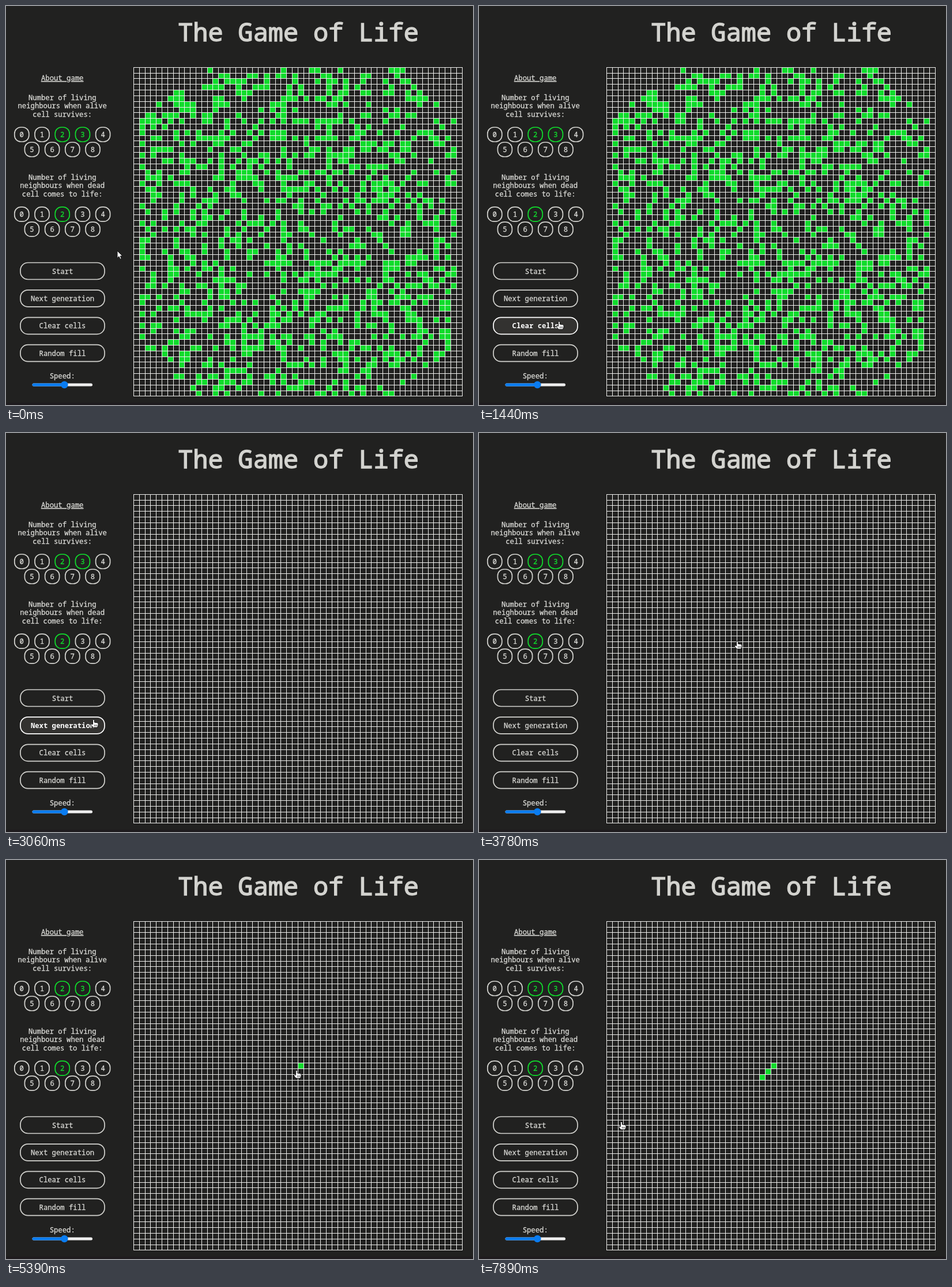
Animation, 810 px wide and 691 px high, one loop 8000 ms. Source, as an HTML page:

```html
<!DOCTYPE html>
<html lang="en">
<head>
<meta charset="utf-8">
<title>The Game of Life</title>
<style>
  html, body { margin: 0; width: 100%; height: 100%; overflow: hidden; background: #212120; }
  svg { display: block; }
  text {
    font: 500 12.25px "Noto Sans Mono", monospace; text-anchor: middle;
    fill: #dbdbd7; stroke: #dbdbd7; stroke-width: .3;
  }
  .title { font-size: 43.5px; fill: #d3d3cf; stroke: #d3d3cf; stroke-width: 1.5; }
  .link { text-decoration: underline; }
  .box { fill: none; stroke: #d3d3cf; stroke-width: 1.7; }
  .on .box { stroke: #10dc2c; }
  .on text { fill: #10dc2c; stroke: #10dc2c; }
  .hover .box { fill: #333230; stroke: #fff; }
  .hover text { fill: #fff; stroke: none; font-weight: 700; }
  .cursor { fill: #fff; stroke: #111; stroke-linejoin: round; }
</style>
</head>
<body>
<svg id="stage" width="810" height="691" viewBox="0 0 810 691"></svg>
<script>
const LOOP = 8000, SIZE = 58, PITCH = 9.82, MID_X = 97.7, LINE = 14.7;
const CLEARED = 1830, STEP = 90;
const gridX = i => Math.floor(221.5 + i * PITCH);
const gridY = j => Math.floor(106.3 + j * PITCH);

const label = (x, y, s, cls = '') => `<text x="${x}" y="${y}" class="${cls}">${s}</text>`;
const boxed = (x, y, w, h, r, s, cls = '') => `<g class="${cls}">
  <rect class="box" x="${x - w / 2}" y="${y - h / 2}" width="${w}" height="${h}" rx="${r}"/>
  ${label(x, y + 4.5, s)}</g>`;

function rule(top, lines, chosen) {
  let out = lines.map((s, i) => label(MID_X, top + i * LINE, s)).join('');
  for (let n = 0; n < 9; n++) {
    const x = MID_X + (n < 5 ? n - 2 : n - 6.5) * 35.2;
    const y = top + (n < 5 ? 60 : 86);
    out += boxed(x, y, 25, 25, 11, n, chosen.includes(n) ? 'on' : '');
  }
  return out;
}

const cellPath = (i, j) => `M${gridX(i)} ${gridY(j)}H${gridX(i + 1)}V${gridY(j + 1)}H${gridX(i)}z`;

function gridLines() {
  let d = '';
  for (let i = 0; i <= SIZE; i++) {
    d += `M${gridX(i) + .5} ${gridY(0)}V${gridY(SIZE) + 1}`;
    d += `M${gridX(0)} ${gridY(i) + .5}H${gridX(SIZE) + 1}`;
  }
  return d;
}

// Seeded random cells in a disc that is cut off by the board's edges
function soup() {
  let seed = 20, d = '';
  const random = () => (seed = (seed * 1664525 + 1013904223) % 2 ** 32) / 2 ** 32;
  for (let j = 0; j < SIZE; j++) {
    for (let i = 1; i < SIZE - 1; i++) {
      const inside = Math.hypot(i - 28.5, j - 28.5) < 34;
      if (random() < .33 && inside) d += cellPath(i, j);
    }
  }
  return d;
}

const buttons = ['Start', 'Next generation', 'Clear cells', 'Random fill'];
const buttonY = n => 459 + n * 47.4;

// Each click fills the next cell of a diagonal
const clickTimes = [4830, 5890, 7170];
const clicked = t => clickTimes.map((at, n) => t >= at ? cellPath(29 - n, 25 + n) : '').join('');

// Where the pointer goes, and when it sets off and arrives
const waypoints = [
  { from: 720, to: 1000, x: 155, y: 503 },
  { from: 1170, to: 1440, x: 139, y: 546 },
  { from: 2780, to: 3060, x: 152, y: 496 },
  { from: 3110, to: 3330, x: 309, y: 378 },
  { from: 3560, to: 3780, x: 448, y: 360 },
  { from: 3830, to: 4280, x: 512, y: 357 },
  { from: 5170, to: 5390, x: 504, y: 364 },
  { from: 6280, to: 6670, x: 494, y: 373 },
  { from: 7610, to: 7890, x: 247, y: 453 }
];

function pointerAt(t) {
  let x = 193, y = 424;
  for (const p of waypoints) {
    if (t < p.from) break;
    const gaps = Math.round((p.to - p.from) / STEP);
    const done = Math.floor((t - p.from) / (p.to - p.from) * gaps + 1e-6) + 1;
    const k = Math.min(1, done / (gaps + 1));
    x += (p.x - x) * k;
    y += (p.y - y) * k;
  }
  return [Math.round(x), Math.round(y)];
}

document.getElementById('stage').innerHTML = `
  <rect width="810" height="691" fill="#212120"/>
  <rect y="687" width="810" height="4" fill="#1e1b1e"/>
  ${label(507, 61, 'The Game of Life', 'title')}
  ${label(MID_X, 129, 'About game', 'link')}
  ${rule(162.5, ['Number of living', 'neighbours when alive', 'cell survives:'], [2, 3])}
  ${rule(300.7, ['Number of living', 'neighbours when dead', 'cell comes to life:'], [2])}
  ${buttons.map((s, n) => boxed(98, buttonY(n), 146, 29, 13, s, 'button')).join('')}
  ${label(MID_X, 645, 'Speed:')}
  <rect x="45.5" y="653.5" width="104.5" height="5" rx="2.5" fill="#efefef"/>
  <rect x="45.5" y="653.5" width="56" height="5" rx="2.5" fill="#0a7cf0"/>
  <circle cx="101.3" cy="656" r="6.2" fill="#0a7cf0"/>
  <g shape-rendering="crispEdges">
    <path id="cells" fill="#10dc2c"/>
    <path d="${gridLines()}" fill="none" stroke="#f0f0ee"/>
  </g>
  <g id="pointer" class="cursor">
    <path id="arrow" d="M0 0v12.5l3-2.7 2 4.7 2.2-1-2-4.5h4z"/>
    <g id="hand">
      <path d="M-1.5 8V1.6a1.4 1.4 0 0 1 2.8 0V5l5 .8q1.7.3 1.7 2V10l-1.5 4H-1l-4-5q.5-2 3.5-.5z"/>
      <path d="M1.5 9v3M3.5 9v3M5.5 9v3" stroke-width=".7"/>
    </g>
  </g>`;

const [cells, pointer, arrow, hand] =
  ['cells', 'pointer', 'arrow', 'hand'].map(id => document.getElementById(id));
const buttonNodes = [...document.querySelectorAll('.button')];
const fullBoard = soup();

function draw(t) {
  const board = t < CLEARED ? fullBoard : clicked(t);
  if (cells.getAttribute('d') !== board) cells.setAttribute('d', board);

  const [x, y] = pointerAt(t);
  let active = x >= gridX(0) && x <= gridX(SIZE) && y >= gridY(0) && y <= gridY(SIZE);
  buttonNodes.forEach((node, n) => {
    const over = Math.abs(x - 98) < 74 && Math.abs(y - buttonY(n)) < 15.5;
    node.classList.toggle('hover', over);
    active = active || over;
  });
  pointer.setAttribute('transform', `translate(${x} ${y})`);
  hand.style.display = active ? '' : 'none';
  arrow.style.display = active ? 'none' : '';
}

const began = performance.now();
function tick() {
  draw((performance.now() - began) % LOOP);
  requestAnimationFrame(tick);
}
tick();
</script>
</body>
</html>
```
